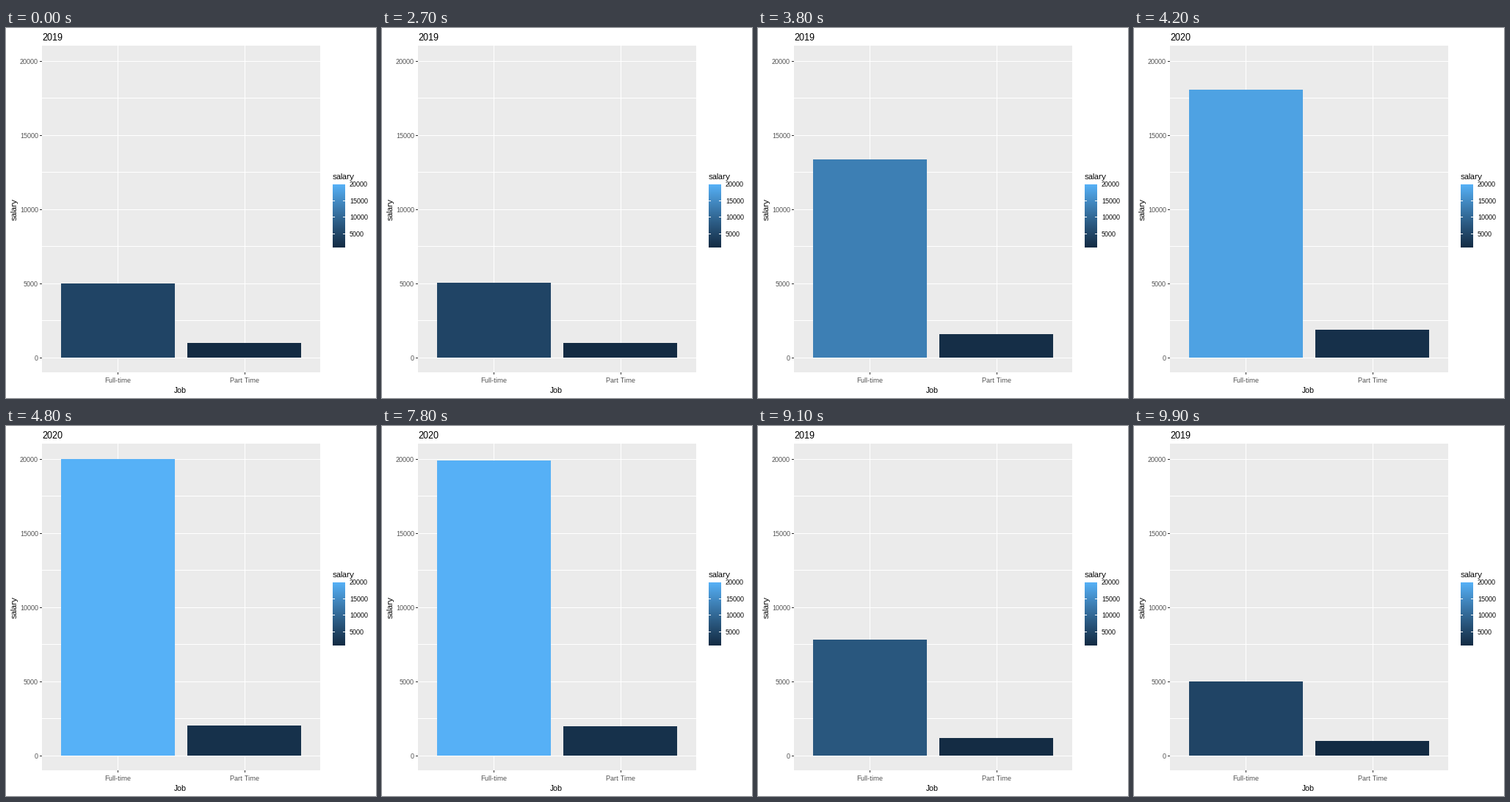
Recreate the animation shown at these times as a matplotlib script. Size 504 by 504 pixels, loop 10000 ms.

```python
import numpy as np
import matplotlib.pyplot as plt
from matplotlib.animation import FuncAnimation
from matplotlib.patches import Rectangle

plt.rcParams.update({
    "font.family": "Liberation Sans",
    "text.hinting": "native",
    "text.hinting_factor": 1,
})

SIZE, DPI = 504, 72
FRAMES, INTERVAL = 100, 100
PHASE = 25                      # frames per hold and per transition

LEFT, RIGHT, TOP, BOTTOM = 49, 428, 24, 469
BAR_X = (75, 247)
BAR_W = 155
TICK_X = (152, 325)
SALARY = {"2019": (5000, 1000), "2020": (20000, 2000)}

# colour scale, blended in CIE Lab
TO_XYZ = np.array([[0.4124564, 0.3575761, 0.1804375],
                   [0.2126729, 0.7151522, 0.0721750],
                   [0.0193339, 0.1191920, 0.9503041]])
WHITE = TO_XYZ.sum(axis=1)


def to_lab(rgb):
    c = np.array(rgb) / 255
    lin = np.where(c > 0.04045, ((c + 0.055) / 1.055) ** 2.4, c / 12.92)
    r = TO_XYZ @ lin / WHITE
    f = np.where(r > 0.008856, np.cbrt(r), 7.787 * r + 16 / 116)
    return np.array([116 * f[1] - 16, 500 * (f[0] - f[1]), 200 * (f[1] - f[2])])


def to_rgb(lab):
    fy = (lab[0] + 16) / 116
    f = np.array([fy + lab[1] / 500, fy, fy - lab[2] / 200])
    r = np.where(f > 0.206893, f ** 3, (f - 16 / 116) / 7.787)
    lin = np.clip(np.linalg.solve(TO_XYZ, r * WHITE), 0, 1)
    c = np.where(lin > 0.0031308, 1.055 * lin ** (1 / 2.4) - 0.055, 12.92 * lin)
    return np.round(np.clip(c, 0, 1) * 255) / 255


DARK, LIGHT = to_lab((19, 43, 67)), to_lab((86, 177, 247))


def fill_for(value):
    t = (value - 1000) / 19000
    return to_rgb(DARK + (LIGHT - DARK) * t)


def y_px(value):
    return int(round(448.8 - 0.0202045 * value))


fig = plt.figure(figsize=(SIZE / DPI, SIZE / DPI), dpi=DPI, facecolor="white")
ax = fig.add_axes([0, 0, 1, 1])
ax.axis("off")


def box(x, y, w, h, color):
    return ax.add_patch(Rectangle((x, y), w, h, facecolor=color,
                                  linewidth=0, antialiased=False))


def label(x, y, text, size, color="black", **kw):
    return ax.text(x, y, text, fontsize=size, color=color, va="baseline", **kw)


# panel, grid and axes
box(LEFT, TOP, RIGHT - LEFT, BOTTOM - TOP, "#EBEBEB")
for v in range(0, 20001, 2500):
    box(LEFT, y_px(v), RIGHT - LEFT, 1, "white")
for v in range(0, 20001, 5000):
    y = y_px(v)
    box(LEFT - 3, y, 3, 1, "#333333")
    label(44, y + 4, str(v), 9, "#4D4D4D", ha="right")
for x, name in zip(TICK_X, ("Full-time", "Part Time")):
    box(x, TOP, 1, BOTTOM - TOP, "white")
    box(x, BOTTOM, 1, 3, "#333333")
    label(x, 483, name, 9, "#4D4D4D", ha="center")
label(237.5, 497, "Job", 11, ha="center")
label(15, 247, "salary", 11, ha="center", rotation=90, rotation_mode="anchor")
title = label(LEFT, 17, "2019", 13)

# legend
KEY_X, KEY_Y, KEY_W, KEY_H = 445, 213, 17, 86
label(KEY_X, 206, "salary", 11)
for i in range(KEY_H):
    box(KEY_X, KEY_Y + i, KEY_W, 1, fill_for(20000 - 19000 * (i + 0.5) / KEY_H))
for v in (5000, 10000, 15000, 20000):
    y = int(round(KEY_Y + (20000 - v) / 19000 * 86.4))
    if v < 20000:
        box(KEY_X, y - 1, 3, 1, "white")
        box(KEY_X + KEY_W - 3, y - 1, 3, 1, "white")
    label(468, y + 3, str(v), 9)

bars = [box(x, 400, BAR_W, 49, "black") for x in BAR_X]
ax.set_xlim(0, SIZE)
ax.set_ylim(SIZE, 0)


def ease(t):
    return 4 * t ** 3 if t < 0.5 else 1 - 4 * (1 - t) ** 3


def update(n):
    phase, k = divmod(n, PHASE)
    start, end = ("2019", "2020") if phase < 2 else ("2020", "2019")
    if phase % 2 == 0:
        k = 0
    p = ease(k / PHASE)
    title.set_text(start if k <= 13 else end)
    for bar, a, b in zip(bars, SALARY[start], SALARY[end]):
        top = y_px(a + (b - a) * p)
        bar.set_y(top)
        bar.set_height(y_px(0) - top)
        ca, cb = to_lab(fill_for(a) * 255), to_lab(fill_for(b) * 255)
        bar.set_facecolor(to_rgb(ca + (cb - ca) * p))
    return [title, *bars]


anim = FuncAnimation(fig, update, frames=FRAMES, interval=INTERVAL,
                     repeat=True, repeat_delay=0, blit=False)
plt.show()
```
